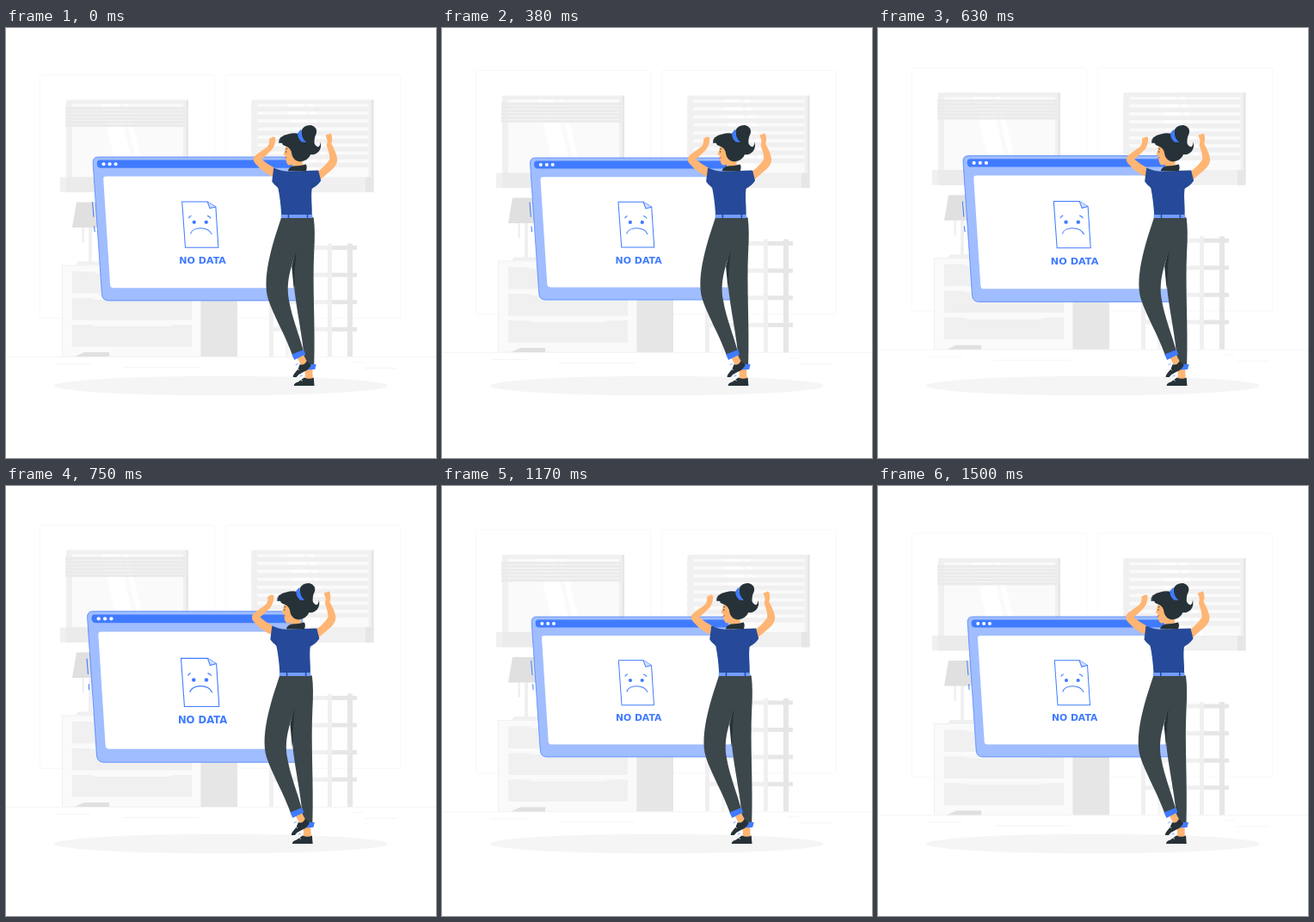
Recreate the animation shown at these times as an HTML page with a canvas. Size 500 by 500 pixels, loop 1540 ms.

```html
<!DOCTYPE html>
<html lang="en">
<head>
<meta charset="utf-8">
<title>No data</title>
<style>
html, body { margin: 0; width: 100%; height: 100%; overflow: hidden; background: #fff; }
canvas { display: block; width: 500px; height: 500px; }
</style>
</head>
<body>
<canvas id="stage"></canvas>
<script>
const canvas = document.getElementById('stage');
const ctx = canvas.getContext('2d');
const ratio = window.devicePixelRatio || 1;
canvas.width = canvas.height = 500 * ratio;

const LOOP = 1540;
const BLUE = '#407bff', LIGHT = '#a0bdff', NAVY = '#264a99';
const SKIN = '#ffb573', DARK = '#263238', PANTS = '#3c474b';
const G1 = '#fafafa', G2 = '#f5f5f5', G3 = '#f0f0f0', G4 = '#ebebeb', G5 = '#e6e6e6', G6 = '#e0e0e0';

// Keyframes are [position, value] pairs, joined linearly.
const CLOCK = [[0, 36], [210, 238], [540, 570], [750, 784], [960, 976], [1170, 1192], [1500, 1500], [1540, 1536]];
const FLOAT = [[0, 0], [750, -10], [1500, 0]];
const BEAT = [[0, 1], [150, 1.1], [450, 1], [600, 1], [750, 1.1], [900, 1], [1500, 1]];
const SHAKE = [[0, 0], [150, -1], [300, 2], [450, -4], [600, 4], [750, -4], [900, 4], [1050, -4], [1200, 2], [1350, -1], [1500, 0]];

function track(keys, at) {
  let i = 1;
  while (i < keys.length - 1 && at > keys[i][0]) i++;
  const [a, from] = keys[i - 1], [b, to] = keys[i];
  return from + (to - from) * (at - a) / (b - a);
}

function fill(color, d) {
  ctx.fillStyle = color;
  ctx.fill(new Path2D(d));
}

function stroke(color, width, d) {
  ctx.strokeStyle = color;
  ctx.lineWidth = width;
  ctx.stroke(new Path2D(d));
}

function box(color, x1, y1, x2, y2) {
  ctx.fillStyle = color;
  ctx.fillRect(x1, y1, x2 - x1, y2 - y1);
}

function dot(color, x, y, r) {
  ctx.fillStyle = color;
  ctx.beginPath();
  ctx.arc(x, y, r, 0, 7);
  ctx.fill();
}

function windowFrame(x) {
  box(G3, x, 84, x + 142, 178);
  box(G5, x + 139.5, 84, x + 142, 178);
  box(G1, x + 7, 89, x + 136, 174);
  fill('#fff', `M${x + 41} 89h20l20 85h-20zM${x + 66} 89h6l20 85h-6z`);
}

function drawRoom() {
  stroke(G2, 0.7, 'M41 55H240Q242.500 55 242.500 57.500V335.500Q242.500 338 240 338H42Q39.500 338 39.500 335.500V57Q39.500 55 41 55z'
    + 'M257 55H456Q458.500 55 458.500 57.500V335.500Q458.500 338 456 338H258Q255.500 338 255.500 335.500V57Q255.500 55 257 55z');
  stroke(G4, 0.5, 'M0 383H500M57 391H98M135 395H224M402 389H415M417 396H454');

  windowFrame(70);
  for (let y = 92; y < 114; y += 4) box(G4, 69, y, 211, y + 3.4);
  box(G3, 63, 174, 212, 191.5);
  box(G4, 70, 174, 212, 191.5);

  windowFrame(285.5);
  for (let y = 92; y < 160; y += 9.3) box(G3, 285, y, 421, y + 5.5);
  box(G3, 285, 174, 427.5, 191.5);
  box(G5, 418, 174, 427.5, 191.5);

  // lamp
  box(G3, 88.5, 232, 91, 250);
  box(G3, 96, 232, 100, 273);
  fill(G6, 'M82 203H113L118 232.500H77z');
  fill(G3, 'M84 272H114V276H81z');

  // dresser
  box(G5, 227, 276, 269, 382.5);
  box(G3, 65, 276, 227, 382.5);
  box(G1, 66, 277, 226, 382);
  for (const y of [283.5, 314.5, 345.5]) {
    box(G3, 77, y, 216, y + 25.5);
    fill(G1, `M98 ${y}H195L188 ${y + 2}H106z`);
  }
  fill(G6, 'M80 382.500L91 377.500H120V382.500z');

  // shelf
  box(G3, 306, 251, 311, 382.5);
  box(G2, 325, 251, 329, 382.5);
  box(G3, 374, 251, 379, 382.5);
  for (let i = 0; i < 4; i++) {
    const y = 253.5 + i * 31.6;
    box(G3, 306, y, 379, y + 5);
    box(G5, 379, y, 408, y + 5);
  }
  box(G5, 397, 251, 403, 382.5);
}

function drawScreen() {
  const frame = 'M110 152H329Q335 152 336 159L346 308Q346.500 315 339.500 315H122Q115 315 114.300 308L104.200 159Q103.700 152 110 152z';
  fill(LIGHT, frame);
  stroke(BLUE, 0.7, frame);
  fill(BLUE, 'M112 155.500H329Q332.500 155.500 332.700 160T329 164.500H113Q109 164.500 108.700 160T112 155.500z');
  for (const x of [116.3, 123.2, 130]) dot('#fff', x, 160, 2);
  fill('#fff', 'M119 174H326Q329 174 329.200 177L337 297Q337.300 300.500 334 300.500H127Q124 300.500 123.700 297L116 177Q115.800 174 119 174z');
  stroke(BLUE, 1, 'M103.600 203L105 220M105.600 230.500L106.200 237');

  // sad page
  stroke(BLUE, 1, 'M205.300 202.700H234L243.500 208.500L246.500 254.800H209z');
  fill('#d0deff', 'M234 202.700L236.800 210.300L243.500 208.500z');
  stroke(BLUE, 1, 'M234 202.700L236.800 210.300L243.500 208.500');
  dot(BLUE, 219, 226, 2.1);
  dot(BLUE, 232.700, 226, 2.1);
  stroke(BLUE, 1.1, 'M212.800 221.500Q213.500 219.500 215.800 218.700M234 218.700Q237 219.300 238 221.700M214.800 239.300C217 230.500 235 230.500 239 239.700');

  ctx.fillStyle = BLUE;
  ctx.font = 'bold 10.8px "DejaVu Sans", sans-serif';
  ctx.textAlign = 'center';
  ctx.textBaseline = 'alphabetic';
  ctx.fillText('NO DATA', 228.6, 273);
}

function drawRightLeg() {
  fill(SKIN, 'M348 396H356.500L357 408H348z');
  fill(DARK, 'M335 416Q335 412.500 340 411.500L347 406.500Q353 409 358 406.500L358.800 416z');
  stroke('#fff', 0.8, 'M342.500 408.500L345 410.500');
  fill(PANTS, 'M337 221H358Q360 235 358.500 260C356.500 300 360 345 358.500 392H347.500C346 360 337 325 335 297z');
  fill(DARK, 'M338 255L332.500 277L335 304Q336 280 338 255z');
  fill(BLUE, 'M347 391H361L359.500 397L349.500 397.500z');
}

function drawLeftLeg() {
  fill(SKIN, 'M339 384L346 380L351 389L344 393z');
  fill(DARK, 'M334 406C334 402 337 401 340 396L342 391Q347 393 350 387L355 392Q353 397 346 400Q341 402 338 406z');
  stroke('#fff', 0.8, 'M338.500 395L341 398');
  stroke(BLUE, 0.7, 'M337 392L340 390M342 405L345 404');
  fill(PANTS, 'M320.500 220H357.500L358.500 240L338 259C329 285 326.500 298 329 315C333 338 341 356 346 375L333.500 381C325 357 312 336 305 315C297 287 313 243 320.500 220z');
  fill(BLUE, 'M332.500 379.500L346.500 374L348.500 379.500L335.500 386z');
}

function drawTorso() {
  fill(SKIN, 'M306.500 131Q306 127.500 309 127.500Q311 125.500 313.500 127.500Q314 135 309.500 141.500Q303 148 297.500 152.500Q304 158.500 313 163L311.500 173Q300 169 290 157.500Q285.500 152 291.500 147L303.500 138.500Q306.500 136 306.500 131z');
  fill(SKIN, 'M372 126Q372 123 375 124Q377 121.500 378.500 123.500Q380.500 129 378.500 134.500Q384 144 385.500 152Q386 158 380 164L366 176L361.500 168Q371 161 376.500 153Q377 147 373 136.500Q375 130 372 126z');
  fill(NAVY, 'M311.500 162.500Q320 166.500 330 167L348 166L363.500 165.500L366.500 177.500Q362 184 356 186.500C354.500 197 356.500 207 356 217.500H320.500Q319.500 200 316.500 185.500Q311.500 182 309.500 178.500z');
  stroke('#1f3d80', 0.6, 'M316.500 186L315 179M356 187L358 179');
  box('#739dff', 320, 217, 356.5, 221);
  box(NAVY, 328, 216.5, 329.5, 221.5);
  box(NAVY, 350, 216.5, 351.5, 221.5);
}

function drawHead() {
  fill(SKIN, 'M325.500 137Q325 142 323 147L325.500 149Q325.500 158 329 159.500L333.500 159V165H345V145L338 135z');
  fill(DARK, 'M328 166.500Q329 161.500 335 160.500Q343 160.500 349 158.500Q351 162 349 166.500z');
  fill(DARK, 'M318 133.500Q318 125 328 123.500Q337 121 344 124L358 133Q361 139 364 138Q366.500 135 365.500 131.500Q368 138 364 143.500Q360 148 354.500 147Q352 154 342 155.500Q334 154 332.500 146.500Q332 140 326 137.500Q321 136 321.500 134z');
  fill(DARK, 'M343.500 120Q346 112.500 355 113Q363 115.500 361 123Q358 128 359 137L350 136Q344 131 343.500 120z');
  fill(BLUE, 'M339.500 122L343.500 117.500Q343.500 128 349.500 133L344 132.500Q339 128 339.500 122z');
  stroke(DARK, 0.8, 'M325.500 141L327.500 140.500M318 134Q317 130 320 127');
  stroke('#c9564a', 0.9, 'M324.500 151.500L327 150.500');
  dot(DARK, 326, 144, 0.7);
}

function drawPerson() {
  drawRightLeg();
  drawLeftLeg();
  drawTorso();
  drawHead();
}

function layer(draw, dx, dy, scale = 1) {
  ctx.save();
  ctx.translate(228.7 + dx, 233.5 + dy);
  ctx.scale(scale, scale);
  ctx.translate(-228.7, -233.5);
  draw();
  ctx.restore();
}

function render(now) {
  const phase = track(CLOCK, (now - start) % LOOP) % 1500;
  ctx.setTransform(ratio, 0, 0, ratio, 0, 0);
  box('#fff', 0, 0, 500, 500);
  layer(drawRoom, 0, track(FLOAT, phase));
  ctx.fillStyle = G2;
  ctx.beginPath();
  ctx.ellipse(250, 416, 194, 11.3, 0, 0, 7);
  ctx.fill();
  layer(drawScreen, 0, 0, track(BEAT, phase));
  layer(drawPerson, track(SHAKE, phase), 0);
}

const start = performance.now();
function tick() {
  render(performance.now());
  requestAnimationFrame(tick);
}
tick();
</script>
</body>
</html>
```
